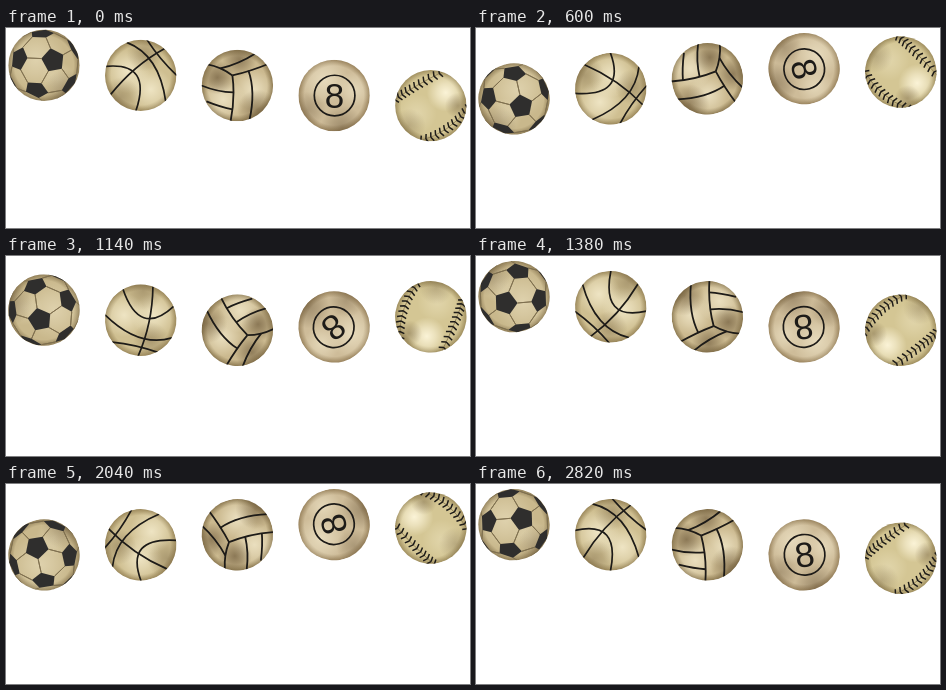
Write an HTML page with a canvas that moves like this. It is 464 px wide and 200 px high and loops after 2880 ms.

```html
<!DOCTYPE html>
<html lang="en">
<head>
<meta charset="utf-8">
<title>Bouncing balls</title>
<style>
html, body { margin: 0; width: 100%; height: 100%; overflow: hidden; background: #fff; }
canvas { display: block; }
</style>
</head>
<body>
<canvas id="stage" width="464" height="200"></canvas>
<script>
const ctx = document.getElementById('stage').getContext('2d');
const R = 35.7, STEP = 60, STEPS = 48, TAU = Math.PI * 2;
const INK = '#1d1b18';

// Soft round patch of light or shade; rgb is "r,g,b".
function glow(x, y, r, rgb, alpha) {
  const g = ctx.createRadialGradient(x, y, 0, x, y, r);
  g.addColorStop(0, `rgba(${rgb},${alpha})`);
  g.addColorStop(0.45, `rgba(${rgb},${alpha * 0.6})`);
  g.addColorStop(1, `rgba(${rgb},0)`);
  ctx.fillStyle = g;
  ctx.fillRect(-R, -R, 2 * R, 2 * R);
}
const light = (x, y, r, a) => glow(x, y, r, '255,248,222', a);
const shade = (x, y, r, a) => glow(x, y, r, '88,68,40', a);

function body(mid, edge) {
  const g = ctx.createRadialGradient(0, 0, 8, 0, 0, R);
  g.addColorStop(0, mid);
  g.addColorStop(0.78, mid);
  g.addColorStop(1, edge);
  ctx.fillStyle = g;
  ctx.fillRect(-R, -R, 2 * R, 2 * R);
}

// Control point of the quadratic curve passing through the middle point.
const control = (a, m, b) => 2 * m - (a + b) / 2;

function arc3(ax, ay, mx, my, bx, by) {
  ctx.beginPath();
  ctx.moveTo(ax, ay);
  ctx.quadraticCurveTo(control(ax, mx, bx), control(ay, my, by), bx, by);
  ctx.stroke();
}

function pen(color, width) {
  ctx.strokeStyle = color;
  ctx.lineWidth = width;
}

// Icosahedron corners, tilted towards the viewer's right.
const tilt = 18 * Math.PI / 180, turn = -29 * Math.PI / 180;
const corners = [];
for (const sign of [1, -1]) {
  corners.push([0, 0, sign]);
  for (let k = 0; k < 5; k++) {
    const a = k * TAU / 5;
    corners.push([sign * Math.cos(a) * 0.8944, sign * Math.sin(a) * 0.8944, sign * 0.4472]);
  }
}
const ico = corners.map(([x, y, z]) => {
  const u = x * Math.cos(tilt) + z * Math.sin(tilt);
  const w = z * Math.cos(tilt) - x * Math.sin(tilt);
  return [u * Math.cos(turn) - y * Math.sin(turn), u * Math.sin(turn) + y * Math.cos(turn), w];
});
const dot = (p, q) => p[0] * q[0] + p[1] * q[1] + p[2] * q[2];
// Point a third of the way from p to q, on the sphere.
function third(p, q) {
  const v = p.map((c, i) => 2 * c + q[i]);
  const len = Math.hypot(...v);
  return v.map(c => c / len);
}
// Flat position; points behind the rim are pushed outside it.
function flat([x, y, z]) {
  const s = z < 0 ? R / (x * x + y * y) : R;
  return [x * s, y * s];
}

function soccer() {
  body('#c9b88c', '#93815a');
  light(-8, -6, 30, 0.4);
  light(14, 14, 18, 0.3);
  shade(22, 26, 22, 0.35);
  for (const p of ico.filter(p => p[2] > -0.3)) {
    const near = ico.filter(q => Math.abs(dot(p, q) - 0.447) < 0.01);
    pen('#7f7050', 0.9);
    for (const q of near) {
      ctx.beginPath();
      ctx.moveTo(...flat(third(p, q)));
      ctx.lineTo(...flat(third(q, p)));
      ctx.stroke();
    }
    const angle = v => Math.atan2(v[1] - p[1], v[0] - p[0]);
    const ring = near.map(q => third(p, q)).sort((a, b) => angle(a) - angle(b));
    ctx.beginPath();
    ring.forEach(v => ctx.lineTo(...flat(v)));
    ctx.closePath();
    ctx.fillStyle = '#2f2e2d';
    ctx.fill();
  }
}

function basket() {
  body('#cfbf91', '#9d8a5d');
  light(-13, -4, 22, 0.65);
  light(10, 14, 22, 0.65);
  shade(-20, 22, 20, 0.3);
  shade(4, -22, 18, 0.3);
  pen(INK, 1.7);
  arc3(-30, 19, -5, -7, 24, -27);
  arc3(-35, -9, -4, 0, -5, 36);
  arc3(-14, -33, 12, -12, 25, 26);
  arc3(6, -36, 20, -17, 36, 0);
}

function volley() {
  body('#cbb98f', '#8f7c54');
  light(-14, 14, 22, 0.6);
  light(16, 4, 20, 0.6);
  shade(-20, -8, 17, 0.55);
  shade(20, 24, 20, 0.45);
  shade(2, -26, 17, 0.5);
  pen(INK, 1.8);
  arc3(-5, -10, -17, -17, -30, -21);
  arc3(-5, -10, 13, -15, 32, -22);
  arc3(-5, -10, -4, 13, -7, 37);
  arc3(-17, -17, 1, -23, 18, -32);
  arc3(11, -15, 15, 8, 12, 35);
  arc3(-4, 7, -20, 5, -36, 0);
  arc3(-5, 24, -17, 21, -31, 16);
}

function eight() {
  body('#cebc99', '#9b855f');
  light(-10, -16, 24, 0.5);
  light(20, -6, 18, 0.45);
  shade(8, 32, 22, 0.4);
  shade(-26, 14, 18, 0.3);
  pen(INK, 1.7);
  ctx.beginPath();
  ctx.arc(0.5, 0, 20.3, 0, TAU);
  ctx.stroke();
  ctx.fillStyle = INK;
  ctx.font = '35px "Liberation Sans", Arial, sans-serif';
  ctx.textAlign = 'center';
  ctx.fillText('8', 0.5, 12);
}

// Seam with slanted stitches on both sides.
function seam(ax, ay, mx, my, bx, by) {
  const cx = control(ax, mx, bx), cy = control(ay, my, by);
  pen('#8a7a52', 0.8);
  arc3(ax, ay, mx, my, bx, by);
  pen(INK, 1.5);
  ctx.beginPath();
  for (let i = 0; i <= 11; i++) {
    const t = i / 11, s = 1 - t;
    const x = s * s * ax + 2 * s * t * cx + t * t * bx;
    const y = s * s * ay + 2 * s * t * cy + t * t * by;
    const a = Math.atan2(s * (cy - ay) + t * (by - cy), s * (cx - ax) + t * (bx - cx));
    for (const side of [1, -1]) {
      ctx.moveTo(x, y);
      ctx.lineTo(x + 5 * Math.cos(a + side * 1.2), y + 5 * Math.sin(a + side * 1.2));
    }
  }
  ctx.stroke();
}

function baseball() {
  body('#d4c694', '#a08f5f');
  light(15, -13, 19, 0.9);
  light(-14, 8, 20, 0.3);
  shade(-22, 20, 17, 0.25);
  shade(27, 0, 13, 0.35);
  seam(-36, -6, -14, -20, 14, -35);
  seam(-10, 35, 16, 23, 37, 3);
}

const balls = [soccer, basket, volley, eight, baseball];

function draw(now) {
  const n = Math.floor(now / STEP) % STEPS;
  ctx.fillStyle = '#fff';
  ctx.fillRect(0, 0, 464, 200);
  balls.forEach((paint, i) => {
    const phase = (n - 3 * i + 24) % 24;
    const drop = 12 - Math.abs(12 - phase);
    ctx.save();
    ctx.translate(38 + 96.7 * i, 37.3 + drop * 3.36);
    ctx.rotate(n / STEPS * TAU);
    ctx.beginPath();
    ctx.arc(0, 0, R, 0, TAU);
    ctx.clip();
    paint();
    ctx.restore();
  });
}

function tick() {
  draw(performance.now());
  requestAnimationFrame(tick);
}
tick();
</script>
</body>
</html>
```
